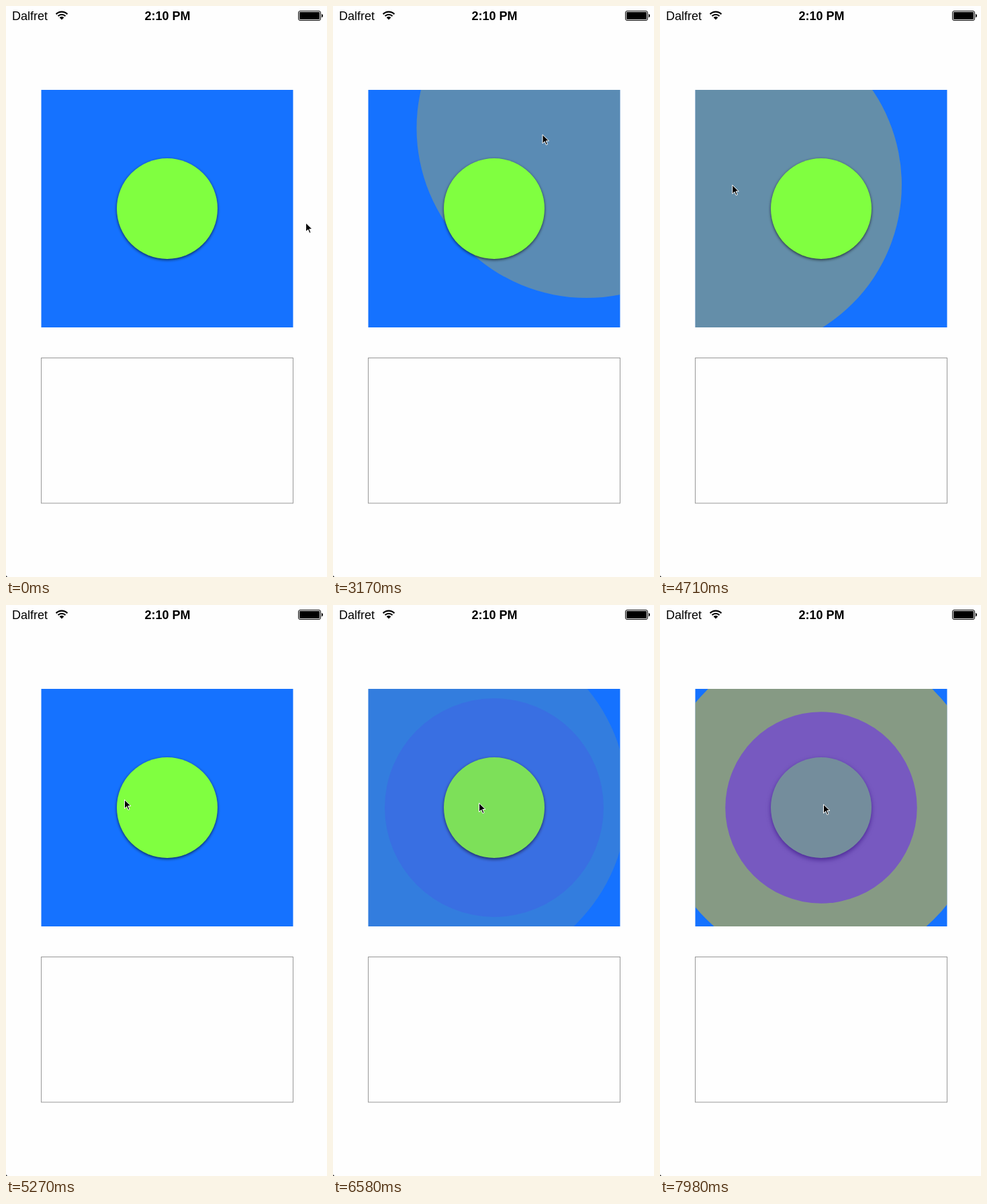
These frames come from a looping animation (478 by 851 pixels, 8 s). An HTML page:

```html
<!DOCTYPE html>
<html lang="en">
<head>
<meta charset="utf-8">
<title>Tap ripple</title>
<style>
  html, body { margin: 0; width: 100%; height: 100%; overflow: hidden; background: #fefefe; }
  svg { display: block; width: 100vw; height: 100vh; }
  text { font: 18px "Liberation Sans", Arial, sans-serif; }
  .time { font-weight: bold; text-anchor: middle; }
</style>
</head>
<body>
<svg viewBox="0 0 478 851" preserveAspectRatio="none">
  <defs>
    <clipPath id="panelClip"><rect x="52.5" y="125" width="375" height="354"/></clipPath>
    <filter id="soft" x="-30%" y="-30%" width="160%" height="160%">
      <feGaussianBlur id="blur" stdDeviation="2.25"/>
    </filter>
  </defs>

  <text x="9" y="21">Dalfret</text>
  <g fill="none" stroke="#000" stroke-width="2.2">
    <path d="M74.6 12.1A11.9 11.9 0 0 1 91.4 12.1"/>
    <path d="M77.5 15A7.8 7.8 0 0 1 88.5 15"/>
    <path d="M83 20.5L79.7 17.2A4.7 4.7 0 0 1 86.3 17.2Z" fill="#000" stroke="none"/>
  </g>
  <text class="time" x="240.5" y="21">2:10 PM</text>
  <rect x="435.5" y="7.5" width="33" height="14" rx="2.5" fill="none" stroke="#000"/>
  <rect x="437" y="9" width="30" height="11" rx="1"/>
  <path d="M470 11.8Q472 12.2 472 14.5T470 17.2Z"/>

  <rect x="52.5" y="125" width="375" height="354" fill="#1572ff"/>
  <g clip-path="url(#panelClip)"><circle id="wave" fill="#fec500"/></g>
  <g filter="url(#soft)"><circle id="shadow" cx="240" r="75"/></g>
  <circle cx="240" cy="302" r="75" fill="#80ff40"/>
  <circle id="glow" cx="240" cy="302" fill="#6714ff"/>

  <rect x="52.5" y="524.5" width="375" height="216.5" fill="none" stroke="#979797"/>
  <path d="M0 848.5Q.5 850.5 2.5 851H0Z"/>

  <path id="cursor" d="M.5 1.2V14.4L3.7 11.3L5.9 16.5L8 15.6L5.8 10.5H10Z"
        stroke="#fff" stroke-width="1"/>
</svg>

<script>
const LOOP = 8000, FADE = 460, BURST = 75;
const WAVE_R = 187.5, GLOW_R = 90;

const taps = [
  { x: 377.5, y: 182, down: 1855, grow: 235, up: 2846 },
  { x: 109.5, y: 266.5, down: 3745, grow: 235, up: 4406 },
  { x: 178, y: 291, down: 5452, grow: 160, up: 6179, button: true },
  { x: 238.5, y: 298, down: 6980, grow: 190, up: 7742, button: true }
];

const ease = {
  hold: () => 0,
  smooth: u => u * u * (3 - 2 * u),
  in: u => u * u,
  out: u => 1 - (1 - u) ** 1.6
};

// Time, x, y and the easing towards the next stop.
const stops = [
  [0, 446, 322, "hold"], [730, 446, 322, "smooth"], [1310, 375, 180, "hold"],
  [2870, 375, 180, "in"], [3170, 311.5, 190.5, "out"], [3660, 112, 264.5, "smooth"],
  [3715, 107, 265.5, "hold"], [4690, 107, 265.5, "smooth"], [5210, 172, 288, "smooth"],
  [5270, 176, 289, "hold"], [6280, 176, 289, "in"], [6580, 217, 294, "out"],
  [6980, 243, 296, "hold"], [LOOP, 243, 296, "hold"]
];

const $ = id => document.getElementById(id);
const mix = (a, b, u) => a + (b - a) * u;
const clamp = u => Math.min(1, Math.max(0, u));
const set = (id, attrs) => {
  for (const key in attrs) $(id).setAttribute(key, attrs[key]);
};

// Cubic bezier (0, 0, .58, 1)
function easeOut(u) {
  let lo = 0, hi = 1;
  for (let i = 0; i < 20; i++) {
    const s = (lo + hi) / 2;
    if (1.74 * (1 - s) * s * s + s ** 3 < u) lo = s; else hi = s;
  }
  return 3 * (1 - lo) * lo * lo + lo ** 3;
}

function ripple(tap, base, t) {
  const press = clamp((t - tap.down) / tap.grow);
  const lift = clamp((t - tap.up) / FADE);
  return {
    r: base * easeOut(press) + BURST * easeOut(lift),
    opacity: press * (1 - lift)
  };
}

function moveCursor(t) {
  const i = stops.findIndex(s => s[0] > t);
  const [t0, x0, y0, kind] = stops[i - 1], [t1, x1, y1] = stops[i];
  const u = ease[kind]((t - t0) / (t1 - t0));
  set("cursor", { transform: `translate(${mix(x0, x1, u)} ${mix(y0, y1, u)})` });
}

function draw(t) {
  const tap = taps.find(p => t >= p.down && t < p.up + FADE);
  const wave = tap ? ripple(tap, WAVE_R, t) : { r: 0, opacity: 0 };
  const glow = tap && tap.button ? ripple(tap, GLOW_R, t) : { r: 0, opacity: 0 };
  const raised = glow.opacity;

  set("wave", { cx: tap ? tap.x : 0, cy: tap ? tap.y : 0, ...wave });
  set("glow", glow);
  set("shadow", { cy: 302 + mix(1.5, 4.5, raised), opacity: mix(0.65, 0.6, raised) });
  set("blur", { stdDeviation: mix(2.25, 5, raised) });
  moveCursor(t);
}

let start;
function tick(now) {
  start ??= now;
  draw(Math.max(0, now - start) % LOOP);
  requestAnimationFrame(tick);
}
draw(0);
requestAnimationFrame(tick);
</script>
</body>
</html>
```
